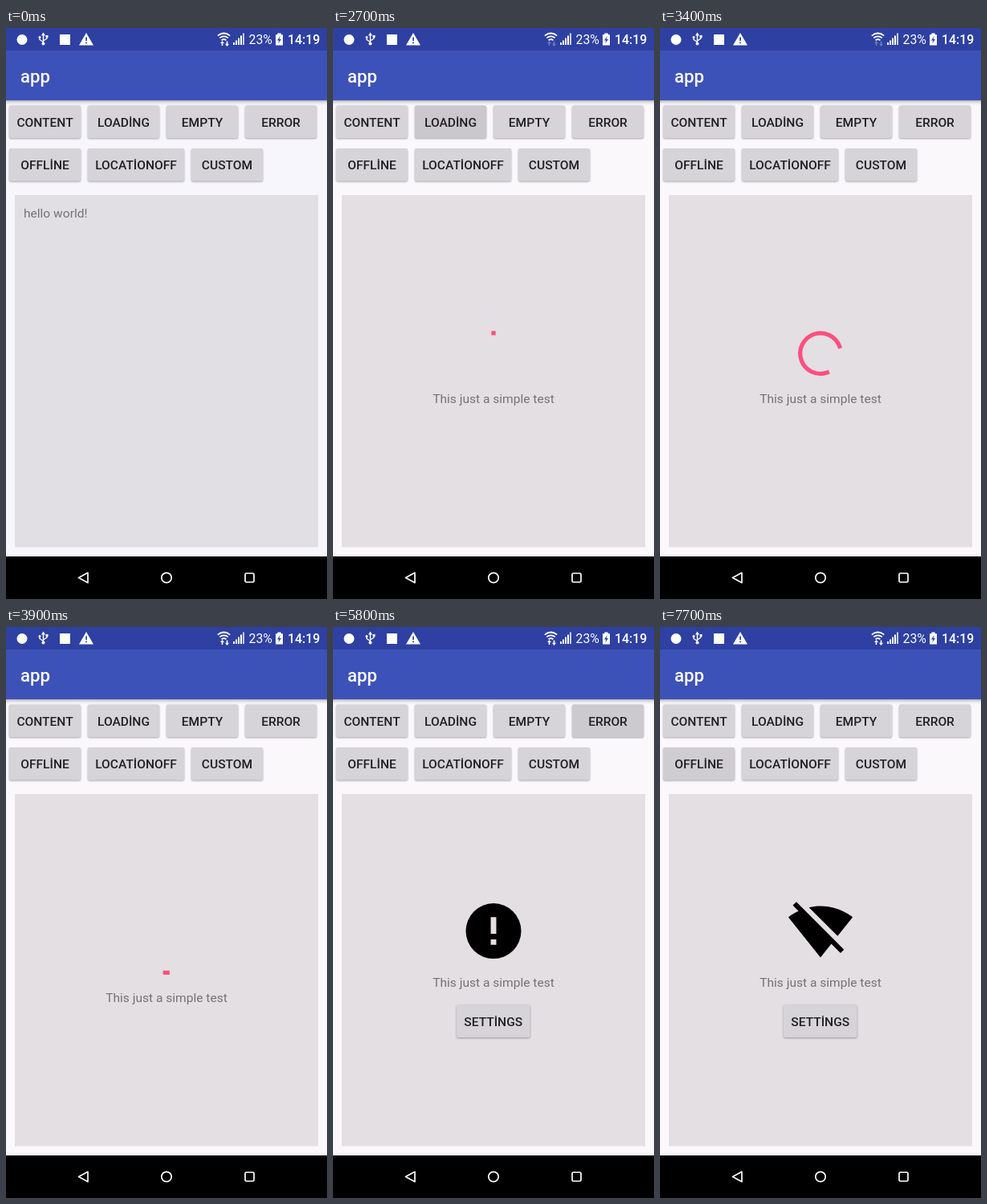
Animation of 400 by 711 pixels, one loop 8000 ms. Source, as an HTML page:

```html
<!DOCTYPE html>
<html lang="en">
<head>
<meta charset="utf-8">
<title>App states</title>
<style>
  html, body { margin: 0; width: 100%; height: 100%; overflow: hidden; background: #000; }
  svg { display: block; width: 100%; height: 100%; }
  text { font-family: Roboto, sans-serif; font-size: 15.55px; }
  .btn rect { filter: drop-shadow(0 1px 1.2px rgba(0, 0, 0, .34)); }
  .btn text { font-weight: 500; fill: #202022; text-anchor: middle; }
  .note { fill: #747275; }
  .mid { text-anchor: middle; }
</style>
</head>
<body>
<svg viewBox="0 0 400 711" xmlns="http://www.w3.org/2000/svg">
  <defs>
    <linearGradient id="shade" x2="0" y2="1">
      <stop stop-color="#000" stop-opacity=".3"/>
      <stop offset=".45" stop-color="#000" stop-opacity=".09"/>
      <stop offset="1" stop-color="#000" stop-opacity="0"/>
    </linearGradient>
  </defs>

  <rect id="page" width="400" height="660"/>
  <rect id="panel" x="11" y="208" width="378" height="438.5"/>
  <rect y="90" width="400" height="6" fill="url(#shade)"/>
  <rect width="400" height="90" fill="#3d52b8"/>
  <rect width="400" height="28" fill="#2e40a2"/>
  <text x="18" y="68" fill="#fff" style="font-size:22.2px;font-weight:500">app</text>

  <!-- status bar -->
  <g fill="#fff">
    <circle cx="20" cy="14.5" r="6.5"/>
    <g fill="none" stroke="#fff" stroke-width="1.4">
      <path d="M46.5 9V19M46.5 17.5L42 14.5V12M46.5 16L51 13V10.5"/>
    </g>
    <path d="M46.5 5.5L49 9.5H44Z"/>
    <circle cx="46.5" cy="19.5" r="2"/>
    <circle cx="42" cy="11.5" r="1.5"/>
    <rect x="49.5" y="9" width="3" height="3"/>
    <rect x="67" y="8" width="13" height="13"/>
    <path d="M100 6L109 21.5H91Z"/>
    <path d="M99.2 11.5h1.7v4.5h-1.7zM99.2 17.6h1.7v1.7h-1.7z" fill="#2e40a2"/>
    <g fill="none" stroke="#fff" stroke-width="1.7">
      <path d="M263.8 9.6Q271.5 3.4 279.2 9.6M266.2 12.4Q271.5 8.2 276.8 12.4M268.6 15.2Q271.5 13 274.4 15.2"/>
    </g>
    <g id="traffic">
      <path d="M269.5 16L272 19H270.3V22H268.7V19H267Z"/>
      <path d="M275.5 23L273 19.8H274.7V16.5H276.3V19.8H278Z"/>
    </g>
    <path d="M283 18h2v3h-2zM286 15.5h2v5.5h-2zM289 12.5h2v8.5h-2zM292 9.5h2v11.5h-2z"/>
    <path d="M295 6.5h2v14.5h-2z" opacity=".75"/>
    <text x="302.5" y="20" style="font-size:15.8px">23%</text>
    <path d="M338.3 6.5h4.4v1.7h2.3v13.3h-9V8.2h2.3z"/>
    <path d="M341.8 9.8L338 15.4h2.3L339.2 19.6 343 14h-2.4z" fill="#2e40a2"/>
    <text x="351" y="20" style="font-size:15.9px;font-weight:500">14:19</text>
  </g>

  <g id="buttons"></g>

  <!-- panel states -->
  <g id="content"><text class="note" x="22" y="235.5">hello world!</text></g>
  <g id="loading">
    <circle id="arc" cx="200" cy="405.2" r="25.3" pathLength="360" fill="none"
      stroke="#fd4f80" stroke-width="5.2" stroke-linecap="square"/>
    <text class="note mid" x="200" y="466.5">This just a simple test</text>
  </g>
  <g id="empty">
    <path transform="translate(158.6 363.8) scale(3.45)" d="M19 3H4.99c-1.11 0-1.98.89-1.98 2L3 19c0 1.1.88 2 1.99 2H19c1.1 0 2-.9 2-2V5c0-1.11-.9-2-2-2zm0 12h-4c0 1.66-1.35 3-3 3s-3-1.34-3-3H4.99V5H19v10z"/>
    <text class="note mid" x="200" y="474.5">This just a simple test</text>
  </g>
  <g id="retry">
    <g transform="translate(158.6 337.2) scale(3.45)">
      <path id="error" fill-rule="evenodd" d="M12 2a10 10 0 1 0 0 20a10 10 0 1 0 0-20zM13 17h-2v-2h2zM13 13h-2V7h2z"/>
      <path id="offline" d="M23.64 7c-.45-.34-4.93-4-11.64-4-1.5 0-2.89.19-4.15.48L18.18 13.8zM17.04 15.22L3.27 1.44 2 2.72l2.05 2.06C1.91 5.76.59 6.82.36 7L12 21.5l3.91-4.87 3.32 3.32 1.27-1.27z"/>
    </g>
    <text class="note mid" x="200" y="448">This just a simple test</text>
  </g>

  <!-- navigation bar -->
  <rect y="658" width="400" height="53"/>
  <g fill="none" stroke="#fff" stroke-width="1.7" stroke-linejoin="round">
    <path d="M90.5 684.5L102 678.3V690.7Z"/>
    <circle cx="200" cy="684.5" r="6.2"/>
    <rect x="298" y="679" width="11" height="11" rx="1.5"/>
  </g>
</svg>

<script>
const NS = 'http://www.w3.org/2000/svg';
const $ = id => document.getElementById(id);
const LOOP = 8000, STEP = 100, SPIN = 2705, CYCLE = 1333, TURN = 2222;
const PLAIN = '#d6d4d8';

function node(tag, attrs, parent) {
  const el = document.createElementNS(NS, tag);
  for (const k in attrs) el.setAttribute(k, attrs[k]);
  return parent.appendChild(el);
}

function button(label, x, y, w, parent = $('buttons')) {
  const g = node('g', { class: 'btn' }, parent);
  const face = node('rect', { x, y, width: w, height: 40.5, rx: 2, fill: PLAIN }, g);
  node('text', { x: x + w / 2, y: y + 26.3 }, g).textContent = label;
  return face;
}

button('CONTENT', 4, 96.5, 89);
const loadBtn = button('LOADİNG', 102, 96.5, 89);
const emptyBtn = button('EMPTY', 200, 96.5, 89);
const errorBtn = button('ERROR', 298, 96.5, 89);
const offBtn = button('OFFLİNE', 4, 150, 89);
button('LOCATİONOFF', 102, 150, 120);
button('CUSTOM', 231, 150, 89);
button('SETTİNGS', 154, 470.5, 91.5, $('retry'));

// [time, value] tables, each value held until the next
const states = [[0, 'content'], [2700, 'loading'], [4400, 'empty'], [5800, 'error'], [7300, 'offline']];
const traffic = [[0, 1], [2700, .3], [3600, 1], [6700, .3], [7700, 1]];
const faces = [
  [loadBtn, [[0, PLAIN], [2700, '#cac8cc'], [2800, '#c1bfc3'], [2900, '#bebcc0'], [3000, '#c3c1c5'],
    [3100, '#cac8cc'], [3200, '#d1cfd3'], [3300, PLAIN]]],
  [emptyBtn, [[0, PLAIN], [4400, '#cccace'], [5800, PLAIN]]],
  [errorBtn, [[0, PLAIN], [5800, '#cccace'], [5900, PLAIN]]],
  [offBtn, [[0, PLAIN], [7300, '#cfcdd1']]]
];
const at = (table, t) => table.filter(row => row[0] <= t).pop()[1];

// cubic Bezier easing solved by bisection
function ease(x, x1, x2) {
  if (x <= 0) return 0;
  if (x >= 1) return 1;
  let lo = 0, hi = 1, u;
  for (let i = 0; i < 24; i++) {
    u = (lo + hi) / 2;
    const v = 1 - u;
    if (3 * u * v * v * x1 + 3 * u * u * v * x2 + u * u * u < x) lo = u; else hi = u;
  }
  return u * u * (3 - 2 * u);
}

function spin(ms) {
  const p = ms % CYCLE / CYCLE;
  const head = 270 * ease(p * 2, .4, .2);
  const tail = 270 * ease(p * 2 - 1, .4, .2);
  const turn = 90 * p + 360 * ms / TURN - 90;
  $('arc').setAttribute('stroke-dasharray', `${Math.max(.1, head - tail)} 360`);
  $('arc').setAttribute('transform', `rotate(${turn + tail} 200 405.2)`);
}

function show(id, on) { $(id).style.display = on ? '' : 'none'; }

function draw() {
  const t = Math.floor(performance.now() % LOOP / STEP) * STEP;
  const state = at(states, t);
  for (const [, id] of states) show(id, id === state);
  show('retry', t >= 5800);
  const cool = t < 2700;
  $('page').setAttribute('fill', cool ? '#f8f6fd' : '#fbf8fc');
  $('panel').setAttribute('fill', cool ? '#e1dfe4' : '#e3dfe2');
  $('traffic').setAttribute('opacity', at(traffic, t));
  for (const [face, table] of faces) face.setAttribute('fill', at(table, t));
  if (state === 'loading') spin(Math.max(0, t - SPIN));
  requestAnimationFrame(draw);
}
draw();
</script>
</body>
</html>
```
